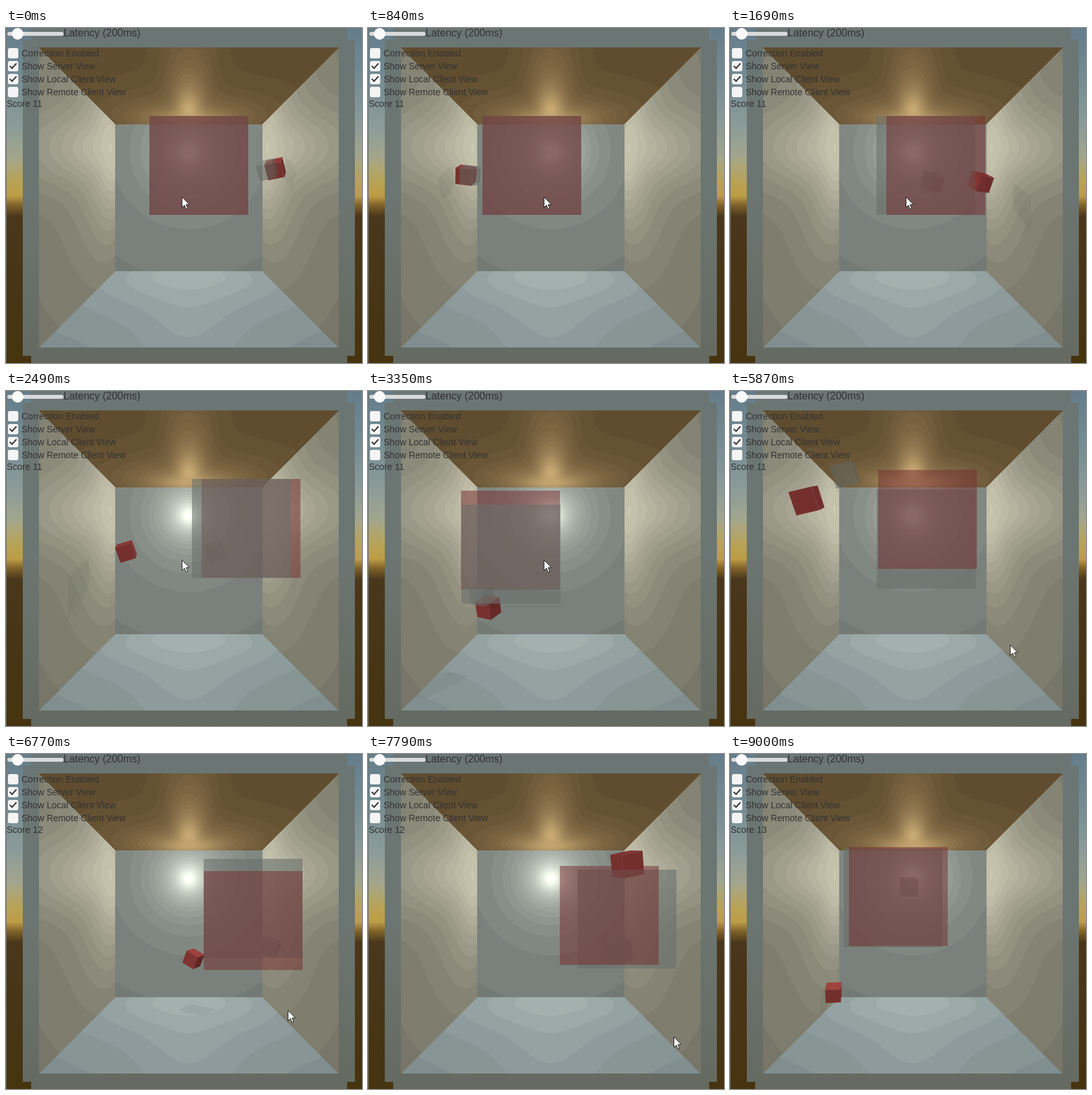
An HTML page with a canvas that plays this animation: 551 by 518 pixels, repeating every 9.1 s.

```html
<!DOCTYPE html>
<html lang="en">
<head>
<meta charset="utf-8">
<title>Latency demo</title>
<style>
html, body { margin: 0; width: 100%; height: 100%; overflow: hidden; background: #6b7471; }
#stage { position: relative; width: 551px; height: 518px; overflow: hidden; font-kerning: none;
  font: 14px/20px "Liberation Sans", Arial, sans-serif; color: #323232; }
#stage > * { position: absolute; white-space: nowrap; }
canvas { left: 0; top: 0; }
.track { left: 2px; top: 6px; width: 87px; height: 6px; border-radius: 3px; background: #d9dbda; }
.knob { left: 9px; top: 0; width: 18px; height: 18px; border-radius: 50%; background: #fafafa; }
.latency { left: 89px; top: 0; font-size: 16px; line-height: 16px; }
.row { left: 24px; }
.row i { position: absolute; left: -21px; top: 2px; width: 16px; height: 16px; border-radius: 3px; background: #f3f4f3; }
.on i::after { content: ""; position: absolute; left: 5px; top: 1px; width: 4px; height: 9px;
  border: solid #333; border-width: 0 2px 2px 0; transform: rotate(42deg); }
#score { left: 1px; top: 107px; }
#cursor { left: 0; top: 0; animation: drift 9.1s linear infinite; }
@keyframes drift {
  0%, 45% { transform: translate(272px, 261px); }
  52%, 55.6% { transform: translate(431px, 389px); }
  74.4% { transform: translate(436px, 396px); }
  93.5% { transform: translate(499px, 466px); }
  98.9%, 100% { transform: translate(526px, 530px); }
}
</style>
</head>
<body>
<div id="stage">
  <canvas id="view" width="551" height="518"></canvas>
  <div class="track"></div>
  <div class="knob"></div>
  <div class="latency">Latency (200ms)</div>
  <div class="row" style="top:29px"><i></i>Correction Enabled</div>
  <div class="row on" style="top:49px"><i></i>Show Server View</div>
  <div class="row on" style="top:69px"><i></i>Show Local Client View</div>
  <div class="row" style="top:89px"><i></i>Show Remote Client View</div>
  <div id="score">Score 11</div>
  <svg id="cursor" width="14" height="22"><path d="M.5 .5V16.5L4.2 13L6.8 19.2L9.3 18.1L6.7 12H11.7Z" fill="#fff" stroke="#222"/></svg>
</div>
<script>
const LOOP = 9100, LAST = 9000, LAG = 200, RESET = 2860;
const CX = 283, CY = 262.4, BACK = 113.5, FRONT = 232, DEPTH = 3.92;
const LIGHT = [0, -0.64, DEPTH - 0.22];
const PANEL = 153, CUBE = 0.082, REACH = 0.915;

// Cube flights as if the walls were mirrors: time, x, y, depth (0 back, 1 front, 2 back again).
const serverFlights = [
  [[0, .935, -.3, .25], [840, 2.8, -.23, .28], [2490, 6.66, -.1, .22], [RESET, 7.5, -.07, .3]],
  [[RESET, -1.4, -.12, .5], [3350, -.61, .45, .35], [5060, 2.16, 2.45, .03],
    [6770, 3.715, 4.08, 1.99], [LAST, 6.39, 8.1, 4.1]]
];
const clientFlights = [
  [[0, 1.02, -.29, .25], [840, 2.84, -.23, .28], [2490, 7.59, -.1, .22], [RESET, 8.3, -.07, .9]],
  [[RESET, -1.4, -.2, .5], [3350, -.69, .34, .3], [5060, 1.91, 1.2, .2],
    [6770, 4.53, 3.9, 2.2], [LAST, 5.53, 6.95, 4.3]]
];
// Paddle: time, left, top
const paddle = [
  [0, 222, 136], [600, 177, 136], [840, 177, 136], [2490, 303, 136], [2890, 175, 138],
  [3150, 145, 176], [3350, 144, 154], [3840, 150, 226], [4700, 245, 243], [5060, 221, 246],
  [5950, 230, 110], [6570, 306, 162], [6770, 306, 181], [7550, 330, 180], [8700, 172, 147], [LAST, 184, 144]
];

const canvas = document.getElementById("view"), ctx = canvas.getContext("2d");
const score = document.getElementById("score"), cursor = document.getElementById("cursor");

const dot = (a, b) => a[0] * b[0] + a[1] * b[1] + a[2] * b[2];
const sub = (a, b) => a.map((v, i) => v - b[i]);
const unit = a => { const l = Math.hypot(...a); return a.map(v => v / l); };
const project = p => [CX + p[0] / p[2] * BACK * DEPTH, CY + p[1] / p[2] * BACK * DEPTH];

function at(keys, t) {
  let i = 1;
  while (i < keys.length - 1 && keys[i][0] < t) i++;
  const a = keys[i - 1], b = keys[i];
  const u = Math.min(1, Math.max(0, (t - a[0]) / (b[0] - a[0])));
  return a.slice(1).map((v, j) => v + (b[j + 1] - v) * u);
}

// Bounces a straight run between -r and r.
function fold(u, r) {
  const p = (((u + r) % (4 * r)) + 4 * r) % (4 * r);
  return p < 2 * r ? p - r : 3 * r - p;
}

const ring = (r, corners) => corners.map(([x, y]) => [CX + x * r, CY + y * r]);
const wall = (a, b) => [...ring(BACK, [a, b]), ...ring(FRONT, [b, a])];
const TL = [-1, -1], TR = [1, -1], BR = [1, 1], BL = [-1, 1];
const plaster = { base: [112, 111, 98], tint: [1, .98, .87], gain: 175, gloss: 130 };
const surfaces = {
  back: { n: [0, 0, -1], base: [115, 122, 117], tint: [1, 1, .93], gain: 114, gloss: 40, area: ring(BACK, [TL, TR, BR, BL]) },
  left: { n: [1, 0, 0], ...plaster, area: wall(TL, BL) },
  right: { n: [-1, 0, 0], ...plaster, area: wall(TR, BR) },
  ceiling: { n: [0, 1, 0], base: [90, 72, 44], tint: [.82, .72, .53], gain: 145, gloss: 130, area: wall(TL, TR) },
  floor: { n: [0, -1, 0], base: [114, 128, 131], tint: [1, .98, .88], gain: 185, gloss: 95, area: wall(BL, BR) }
};

function surfaceAt(dx, dy) {
  const ax = Math.abs(dx), ay = Math.abs(dy);
  if (Math.max(ax, ay) <= BACK) return surfaces.back;
  if (ax > ay) return dx < 0 ? surfaces.left : surfaces.right;
  return dy < 0 ? surfaces.ceiling : surfaces.floor;
}

// Diffuse plus glossy light from one lamp, in coarse steps.
function shade(dx, dy) {
  const s = surfaceAt(dx, dy), m = Math.max(BACK, Math.abs(dx), Math.abs(dy));
  const p = [dx / m, dy / m, DEPTH * BACK / m];
  const toLight = sub(LIGHT, p), l = unit(toLight), v = unit(p.map(c => -c));
  const fall = 1 / (1 + dot(toLight, toLight));
  const shine = Math.max(0, dot(s.n, unit(l.map((c, i) => c + v[i])))) ** 22;
  const e = fall * (s.gain * Math.max(0, dot(s.n, l)) + s.gloss * shine);
  const step = Math.round(e / 7) * 7;
  return s.base.map((c, i) => c + step * s.tint[i]);
}

function buildRoom() {
  const room = document.createElement("canvas");
  room.width = 551; room.height = 518;
  const g = room.getContext("2d");
  const gradient = stops => {
    const fill = g.createLinearGradient(0, 0, 0, 518);
    stops.forEach(([y, c]) => fill.addColorStop(y / 518, c));
    return fill;
  };
  g.fillStyle = gradient([[0, "#657d8a"], [60, "#708892"], [150, "#8b9b99"], [200, "#a3a68d"],
    [212, "#aca67a"], [240, "#b9a253"], [260, "#bc9c47"], [274, "#80622a"], [291, "#4a371b"], [518, "#46330f"]]);
  g.fillRect(0, 0, 551, 518);
  g.fillStyle = gradient([[0, "#6b7674"], [260, "#6b7571"], [518, "#656a61"]]);
  g.fillRect(26, 18, 514, 489);
  g.fillRect(39, 0, 489, 518);
  g.fillRect(0, 0, 1, 518);
  const img = g.createImageData(464, 464);
  for (let y = 0, o = 0; y < 464; y++)
    for (let x = 0; x < 464; x++, o += 4)
      img.data.set([...shade(x + 51.5 - CX, y + 30.5 - CY), 255], o);
  g.putImageData(img, 51, 30);
  return room;
}

function turn([x, y, z], [yaw, pitch, roll]) {
  const spin = (a, b, r) => [a * Math.cos(r) - b * Math.sin(r), a * Math.sin(r) + b * Math.cos(r)];
  [z, x] = spin(z, x, yaw);
  [y, z] = spin(y, z, pitch);
  [x, y] = spin(x, y, roll);
  return [x, y, z];
}

function cubeAt(flights, t) {
  const [x, y, depth] = at(flights[t < RESET ? 0 : 1], t);
  const scale = 1.12 + .8 * (fold(depth - .5, .5) + .5);
  const centre = [fold(x, REACH), fold(y, REACH), DEPTH / scale];
  const sway = period => Math.cos(2 * Math.PI * t / period);
  const rot = [.5 * sway(3350), .3, -.35 * sway(2750)];
  const faces = [];
  for (let a = 0; a < 3; a++) for (const s of [-1, 1]) {
    const corners = [[1, 1], [-1, 1], [-1, -1], [1, -1]].map(([u, v]) => {
      const c = [];
      c[a] = s; c[(a + 1) % 3] = u; c[(a + 2) % 3] = v;
      return turn(c, rot).map((w, i) => centre[i] + w * CUBE);
    });
    const axis = [0, 0, 0];
    axis[a] = s;
    faces.push({ n: turn(axis, rot), corners: s < 0 ? corners.reverse() : corners });
  }
  return { centre, faces };
}

const facing = pts => pts.reduce((sum, p, i) => {
  const q = pts[(i + 1) % pts.length];
  return sum + p[0] * q[1] - q[0] * p[1];
}, 0) < 0;

function trace(pts) {
  pts.forEach(([x, y], i) => i ? ctx.lineTo(x, y) : ctx.moveTo(x, y));
  ctx.closePath();
}

function drawCube({ centre, faces }, [r, g, b], alpha) {
  const sun = unit([-.4, -.6, -.7]), lamp = unit(sub(LIGHT, centre));
  for (const f of faces) {
    const pts = f.corners.map(project);
    if (!facing(pts)) continue;
    const s = .75 + .25 * dot(f.n, sun) + .35 * Math.max(0, dot(f.n, lamp));
    ctx.fillStyle = `rgba(${r * s},${g * s},${b * s},${alpha})`;
    ctx.beginPath();
    trace(pts);
    ctx.fill();
  }
}

// Casts the cube from the lamp on to the first surface behind it.
function drawShadow({ centre, faces }) {
  const reach = (s, p) => {
    const edge = s === surfaces.back ? -DEPTH : -1;
    const d = dot(s.n, sub(p, LIGHT));
    return d < -1e-3 ? (edge - dot(s.n, LIGHT)) / d : Infinity;
  };
  const hit = Object.values(surfaces).reduce((a, b) => reach(b, centre) < reach(a, centre) ? b : a);
  const cast = p => {
    const d = reach(hit, p);
    return p.map((c, i) => LIGHT[i] + (c - LIGHT[i]) * d);
  };
  const hulls = faces.map(f => f.corners.map(cast));
  if (hulls.flat().some(p => !(p[2] > .4 && p[2] < 9))) return;
  ctx.save();
  ctx.beginPath();
  trace(hit.area);
  ctx.clip();
  ctx.beginPath();
  hulls.map(h => h.map(project)).filter(facing).forEach(trace);
  ctx.fillStyle = "rgba(70,75,70,.09)";
  ctx.fill();
  ctx.restore();
}

function drawPanel(t, color) {
  const [x, y] = at(paddle, t);
  ctx.fillStyle = color;
  ctx.fillRect(x, y, PANEL, PANEL);
}

const room = buildRoom();
const [drift] = cursor.getAnimations();
drift.pause();

function frame() {
  const now = performance.now() % LOOP, t = Math.min(now, LAST);
  const server = cubeAt(serverFlights, t), client = cubeAt(clientFlights, t);
  ctx.drawImage(room, 0, 0);
  drawShadow(server);
  drawCube(server, [135, 55, 52], 1);
  drawCube(client, [112, 118, 112], .55);
  const panels = [[t - LAG, "rgba(105,112,108,.6)"], [t, "rgba(118,48,50,.53)"]];
  if (t > 1900 && t < 3800) panels.reverse();
  panels.forEach(p => drawPanel(...p));
  score.textContent = "Score " + (11 + (t >= 5950) + (t >= 7850));
  drift.currentTime = now;
  requestAnimationFrame(frame);
}
frame();
</script>
</body>
</html>
```
